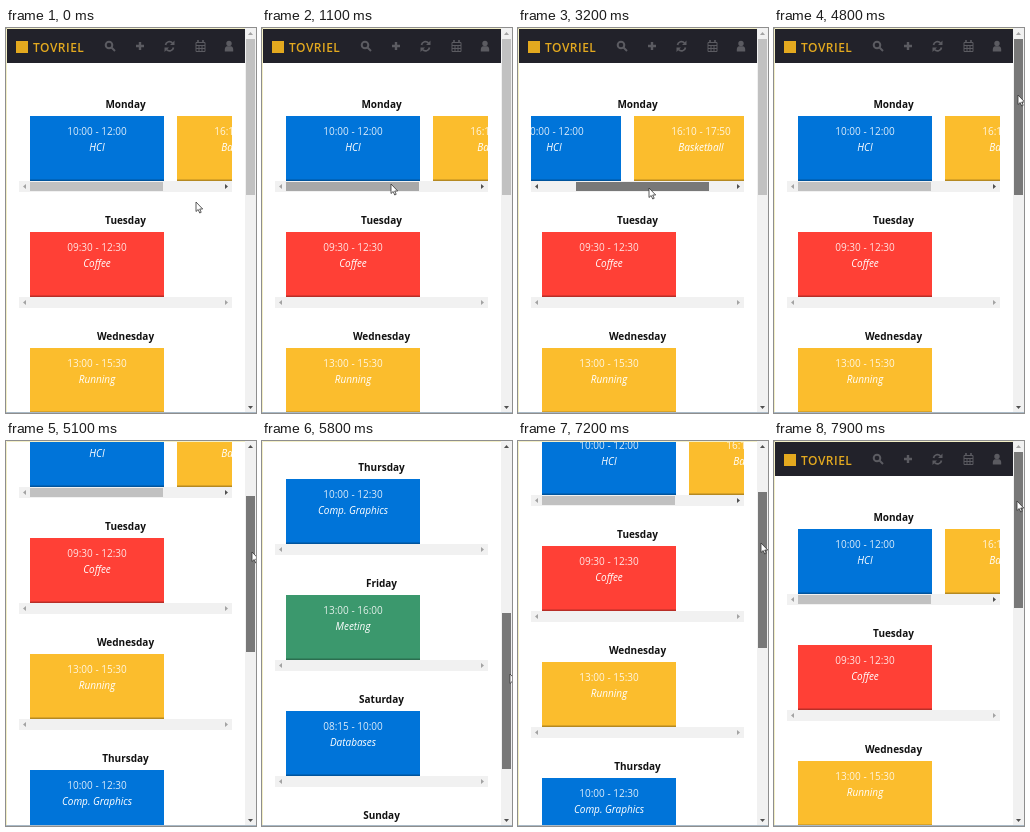
Recreate the animation shown at these times as an HTML page. Size 250 px wide and 385 px high, loop 8000 ms.

```html
<!DOCTYPE html>
<html lang="en">
<head>
<meta charset="utf-8">
<title>Weekly schedule</title>
<style>
  html, body { margin: 0; width: 100%; height: 100%; overflow: hidden; background: #fff; }
  svg { display: block; }
  #stage { position: absolute; left: 0; top: 0; }
  text { font: 10px "Open Sans", "Noto Sans", sans-serif; text-anchor: middle; fill: #fff; }
  .day { font-weight: 700; fill: #111; }
  .time { fill-opacity: .86; }
  .name { font-style: italic; }
  .brand { font-size: 12px; font-weight: 600; letter-spacing: .5px; text-anchor: start; fill: #e3a91f; }
  .icon { fill: none; stroke: #5b5b61; stroke-width: 2; }
  .icon .solid { fill: #5b5b61; stroke: none; }
</style>
</head>
<body>
<svg id="stage" width="250" height="385" viewBox="0 0 250 385">
  <rect width="250" height="385" fill="#fff"/>
  <g id="page">
    <rect width="239" height="35" fill="#22222a"/>
    <rect x="10" y="13" width="12" height="12" fill="#e3a91f"/>
    <text class="brand" x="27" y="23.5">TOVRIEL</text>
    <g class="icon">
      <circle cx="103" cy="17" r="3.3"/>
      <path d="M105.500 19.500L109 23"/>
      <path d="M130 18h8M134 14v8" stroke-width="2.4"/>
      <path d="M159.500 17a4 4 0 0 1 7-2M167.500 19.500a4 4 0 0 1-7 2" stroke-width="1.700"/>
      <path class="solid" d="M168.500 12.500v4.500h-4.500zM158.500 24v-4.500h4.500z"/>
      <path d="M190 14.500h9v9h-9zM190 17.500h9M190 20.500h9M193 17v6M196 17v6" stroke-width="1"/>
      <path d="M192 12v3M197 12v3" stroke-width="1.600"/>
      <circle class="solid" cx="223" cy="15.500" r="2.700"/>
      <path class="solid" d="M218.800 23.500v-2q0-3 2.500-3.200h3.400q2.500.2 2.500 3.200v2z"/>
    </g>
  </g>
  <rect x="239" width="11" height="385" fill="#f1f1f1"/>
  <rect id="vThumb" x="240" y="11" width="9" height="156"/>
  <path id="up" d="M242 7l2.500-3 2.500 3z"/>
  <path id="down" d="M242 378l2.500 3 2.500-3z"/>
  <path d="M.5 385V.5H239" fill="none" stroke="#f3efc6"/>
  <path d="M0 384.500H250" stroke="#a9b9c6"/>
  <path id="cursor" d="M0 0v9.500l2.200-2 1.500 3.500 1.500-.7-1.500-3.300h3z" fill="#fff" stroke="#333" stroke-width=".8"/>
</svg>
<script>
const LOOP = 8000, PITCH = 116;
const BLUE = '#0074d9', RED = '#ff4036', YELLOW = '#fbbd2d', GREEN = '#3b986d';
const week = [
  ['Monday', BLUE, '10:00 - 12:00', 'HCI'],
  ['Tuesday', RED, '09:30 - 12:30', 'Coffee'],
  ['Wednesday', YELLOW, '13:00 - 15:30', 'Running'],
  ['Thursday', BLUE, '10:00 - 12:30', 'Comp. Graphics'],
  ['Friday', GREEN, '13:00 - 16:00', 'Meeting'],
  ['Saturday', BLUE, '08:15 - 10:00', 'Databases'],
  ['Sunday', YELLOW, '11:00 - 12:30', 'Running']
];

// Periods with movement, in tenths of a second; the picture rests between them.
const active = [[0, 6], [9, 17], [18, 27], [30, 38], [39, 42], [44, 46], [48, 52], [54, 59],
  [61, 62], [64, 65], [67, 67], [69, 70], [72, 72], [76, 77], [79, 79]];
// Time followed by values
const hTrack = [[17, 0], [21, 6.5], [26, 58], [29, 58], [32, 34], [37, 0]];
const vTrack = [[48, 0], [52, 58], [58, 161], [62, 207], [63, 207], [67, 106], [70, 62], [72, 40], [76, 8], [77, 0]];
const pointer = [[0, 190, 174], [6, 142, 154], [9, 138, 156], [17, 103, 156], [21, 110, 157],
  [26, 160, 157], [29, 158, 158], [32, 131, 160], [37, 101, 160], [38, 101, 157], [42, 215, 108],
  [44, 230, 71], [46, 243, 64], [48, 244, 67], [52, 246, 126], [58, 248, 233], [62, 247, 273],
  [63, 246, 268], [67, 241, 171], [72, 243, 102], [77, 243, 60]];

const $ = id => document.getElementById(id);
const page = $('page');

function add(parent, tag, attrs, text) {
  const el = document.createElementNS('http://www.w3.org/2000/svg', tag);
  for (const k in attrs) el.setAttribute(k, attrs[k]);
  if (text) el.textContent = text;
  parent.append(el);
  return el;
}

function card(parent, x, [, color, time, name]) {
  add(parent, 'rect', { x, y: 0, width: 134, height: 65, fill: color });
  add(parent, 'rect', { x, y: 63.5, width: 134, height: 1.5, fill: '#000', 'fill-opacity': .28 });
  add(parent, 'text', { x: x + 67, y: 19, class: 'time' }, time);
  add(parent, 'text', { x: x + 67, y: 34.5, class: 'name' }, name);
}

function scrollbar(parent) {
  add(parent, 'rect', { y: 65, width: 213, height: 11, fill: '#f1f1f1' });
  const arrow = d => add(parent, 'path', { d, fill: '#a3a3a3' });
  return [arrow('M7 68l-3 2.500 3 2.500z'), arrow('M206 68l3 2.500-3 2.500z')];
}

let strip, hThumb, arrows;
week.forEach((day, i) => {
  const y = 88 + i * PITCH;
  add(page, 'text', { x: 119.5, y: y - 8, class: 'day' }, day[0]);
  const row = add(page, 'svg', { x: 13, y, width: 213, height: 76 });
  const cards = add(row, 'g', {});
  card(cards, 11, day);
  const ends = scrollbar(row);
  if (i === 0) {
    card(cards, 158, ['', YELLOW, '16:10 - 17:50', 'Basketball']);
    strip = cards;
    arrows = ends;
    hThumb = add(row, 'rect', { x: 11, y: 66, width: 133, height: 9 });
  }
});

function sample(track, t) {
  const i = track.findIndex(p => p[0] > t);
  if (i === 0) return track[0].slice(1);
  if (i < 0) return track[track.length - 1].slice(1);
  const a = track[i - 1], b = track[i], k = (t - a[0]) / (b[0] - a[0]);
  return a.slice(1).map((v, j) => v + (b[j + 1] - v) * k);
}

function settle(t) {
  const span = active.filter(s => s[0] <= t).pop();
  return Math.min(t, span[1]);
}

const move = (el, x, y) => el.setAttribute('transform', `translate(${Math.round(x)} ${Math.round(y)})`);
const paint = (el, color) => el.setAttribute('fill', color);
const arrowColor = on => on ? '#505050' : '#a3a3a3';
const thumbColor = (held, hover) => held ? '#787878' : hover ? '#a8a8a8' : '#c1c1c1';

function draw(ms) {
  const t = settle(Math.floor(ms / 100));
  const [h] = sample(hTrack, t), [v] = sample(vTrack, t), [x, y] = sample(pointer, t);

  move(strip, -h * 1.604, 0);
  move(hThumb, h, 0);
  paint(hThumb, thumbColor(t >= 18 && t < 38, t >= 9 && t < 39));
  paint(arrows[0], arrowColor(h > 0));
  paint(arrows[1], arrowColor(h < 58));

  move(page, 0, -v * 2.469);
  move($('vThumb'), 0, v);
  paint($('vThumb'), thumbColor(t >= 48, t >= 46));
  paint($('up'), arrowColor(v > 0));
  paint($('down'), arrowColor(v < 207));

  move($('cursor'), x, y);
}

const start = performance.now();
function tick() {
  draw((performance.now() - start) % LOOP);
  requestAnimationFrame(tick);
}
tick();
</script>
</body>
</html>
```
